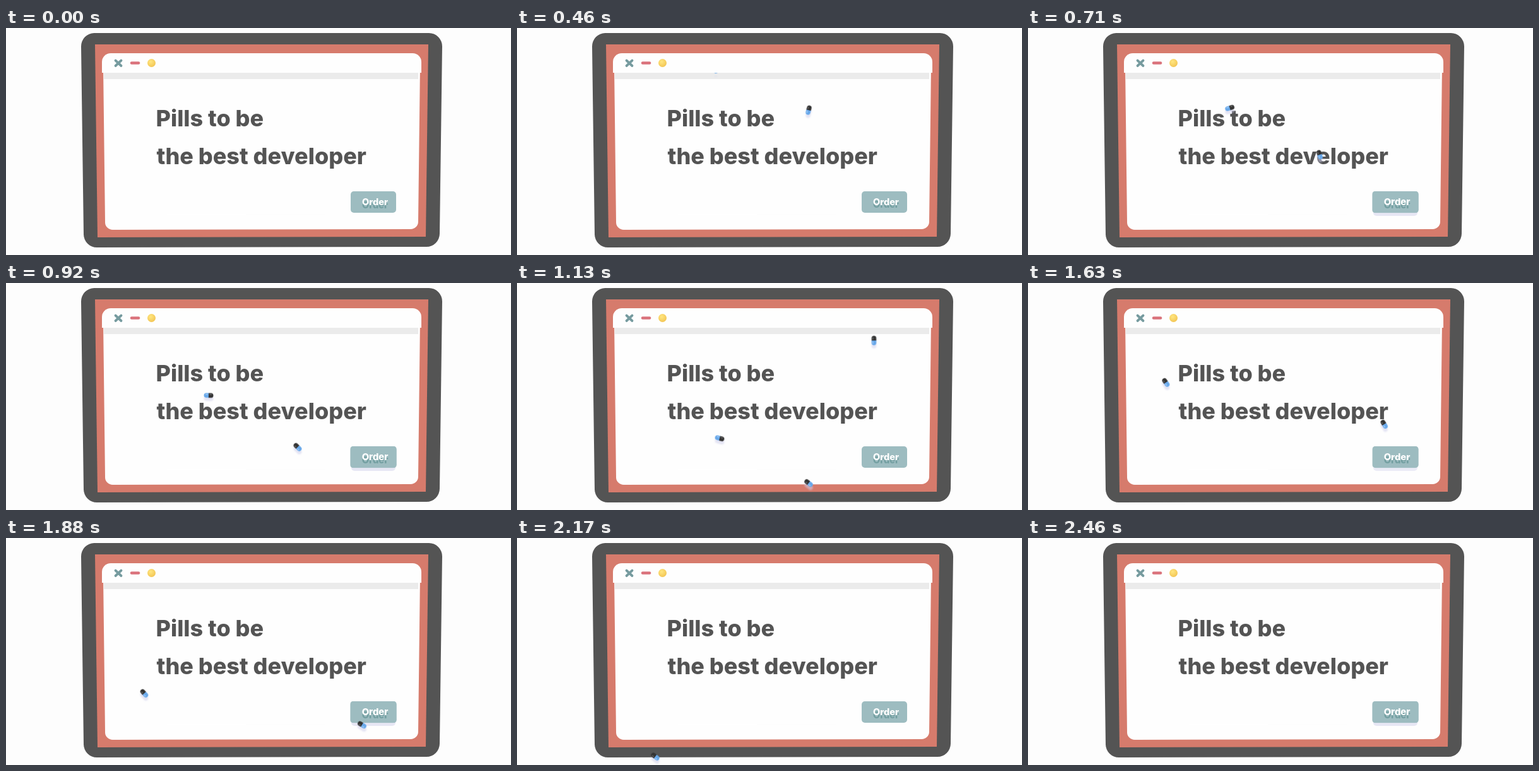
Animation of 800 by 360 pixels, one loop 2500 ms. Source, as an HTML page:

```html
<!DOCTYPE html>
<html lang="en">
<head>
<meta charset="utf-8">
<title>Order page with falling pills</title>
<style>
  html, body { margin: 0; width: 100%; height: 100%; overflow: hidden; background: #fdfdfd; }
  svg { display: block; width: 800px; height: 360px; }
  text { font-family: Inter, "Open Sans", sans-serif; font-weight: 800; }
  .round { stroke-linejoin: round; }
  .title { font-size: 36px; fill: #545454; }
  .order text { font-size: 14.5px; text-anchor: middle; }

  .order, .glow, .pill { animation: 2500ms linear infinite; }
  .order { transform-origin: 582px 276px; animation-name: swell; }
  .glow { animation-name: glow; }
  @keyframes swell {
    0%, 18.4%, 44%, 57%, 84%, 92% { transform: none; }
    28%, 37%, 67%, 76%, 98.4%, 100% { transform: scale(1.022); }
  }
  @keyframes glow {
    0%, 18.4%, 44%, 57%, 84%, 92% { opacity: 0; }
    28%, 37%, 67%, 76%, 98.4%, 100% { opacity: .6; }
  }

  .a { animation-name: fall-a; }
  .b { animation-name: fall-b; }
  .c { animation-name: fall-c; }
  .d { animation-name: fall-d; }
  .falling { filter: drop-shadow(0 5px 1px rgba(205, 205, 235, .55)); }

  @keyframes fall-a {
    0%, 4% { transform: translate(462px, 50px) rotate(40deg); }
    7.6% { transform: translate(462px, 62px) rotate(34deg); }
    18.4% { transform: translate(462px, 130px) rotate(15deg); }
    36.8% { transform: translate(462px, 260px) rotate(-45deg); }
    45.2% { transform: translate(462px, 317px) rotate(-52deg); }
    53%, 100% { transform: translate(462px, 374px) rotate(-60deg); }
  }
  @keyframes fall-b {
    0%, 13% { transform: translate(319px, 50px) rotate(40deg); }
    18.4% { transform: translate(318px, 65.5px) rotate(50deg); }
    36.8% { transform: translate(321px, 178px) rotate(92deg); }
    45.2% { transform: translate(321px, 246px) rotate(105deg); }
    56.8% { transform: translate(320px, 332px) rotate(130deg); }
    63%, 100% { transform: translate(320px, 377px) rotate(143deg); }
  }
  @keyframes fall-c {
    0%, 36.8% { transform: translate(565px, 45px) rotate(6deg); }
    45.2% { transform: translate(565.5px, 91px) rotate(0deg); }
    56.8% { transform: translate(564.5px, 163px) rotate(-8deg); }
    75.2% { transform: translate(564px, 296px) rotate(-58deg); }
    86%, 100% { transform: translate(564px, 375px) rotate(-80deg); }
  }
  @keyframes fall-d {
    0%, 50% { transform: translate(218px, 40px) rotate(-20deg); }
    56.8% { transform: translate(218px, 83px) rotate(-28deg); }
    75.2% { transform: translate(219px, 246px) rotate(-42deg); }
    90%, 100% { transform: translate(219px, 374px) rotate(-54deg); }
  }
</style>
</head>
<body>
<svg viewBox="0 0 800 360">
  <defs>
    <radialGradient id="sun" cx=".4" cy=".35" r=".7">
      <stop offset="0" stop-color="#ffe680"/>
      <stop offset="1" stop-color="#f2c452"/>
    </radialGradient>
    <clipPath id="below"><path d="M0 71H800V360H0z"/></clipPath>
    <g id="pill">
      <path d="M-3.700 0V-3.700a3.700 3.700 0 0 1 7.400 0V0z" fill="#333"/>
      <path d="M-3.700 0V3.700a3.700 3.700 0 0 0 7.400 0V0z" fill="#68a8ea"/>
      <path d="M-1.700-4.500V-2" stroke="#777" stroke-linecap="round"/>
      <path d="M-1.700 2V4.500" stroke="#b9dafa" stroke-linecap="round"/>
    </g>
  </defs>

  <path class="round" d="M140 29H670L666 326 144 327z" fill="#545454" stroke="#545454" stroke-width="42"/>
  <path d="M141 26H669L665 331 145 332z" fill="#d67b6c"/>
  <path class="round" d="M166 60H644L641 307 169 308z" fill="#fefefe" stroke="#fefefe" stroke-width="24"/>
  <path d="M155 71H653V81H155z" fill="#ebebeb"/>
  <path d="M152 71V54a14 14 0 0 1 14-14H644a14 14 0 0 1 14 14V71z" fill="#fefefe"/>

  <path d="M173.500 51.500l9 8.500m0-8.500l-9 8.500" stroke="#769b9f" stroke-width="3.800" stroke-linecap="round"/>
  <path d="M199 55.500h11" stroke="#da727b" stroke-width="4.500" stroke-linecap="round"/>
  <circle cx="230.500" cy="55.500" r="6.500" fill="url(#sun)"/>

  <text class="title" x="237.500" y="156">Pills to be</text>
  <text class="title" x="238.500" y="216">the best developer</text>

  <rect class="glow" x="547" y="263" width="70" height="35" rx="5" fill="#d9d9ee"/>
  <g class="order">
    <rect x="546" y="259" width="72" height="34" rx="5" fill="#9dbcc0"/>
    <text x="584.500" y="285.500" fill="#739fa1">Order</text>
    <text x="584.500" y="281" fill="#fefefe">Order</text>
  </g>

  <g clip-path="url(#below)">
    <g class="falling"><use class="pill a" href="#pill"/></g>
    <g class="falling"><use class="pill b" href="#pill"/></g>
    <g class="falling"><use class="pill c" href="#pill"/></g>
    <g class="falling"><use class="pill d" href="#pill"/></g>
  </g>
</svg>
</body>
</html>
```
